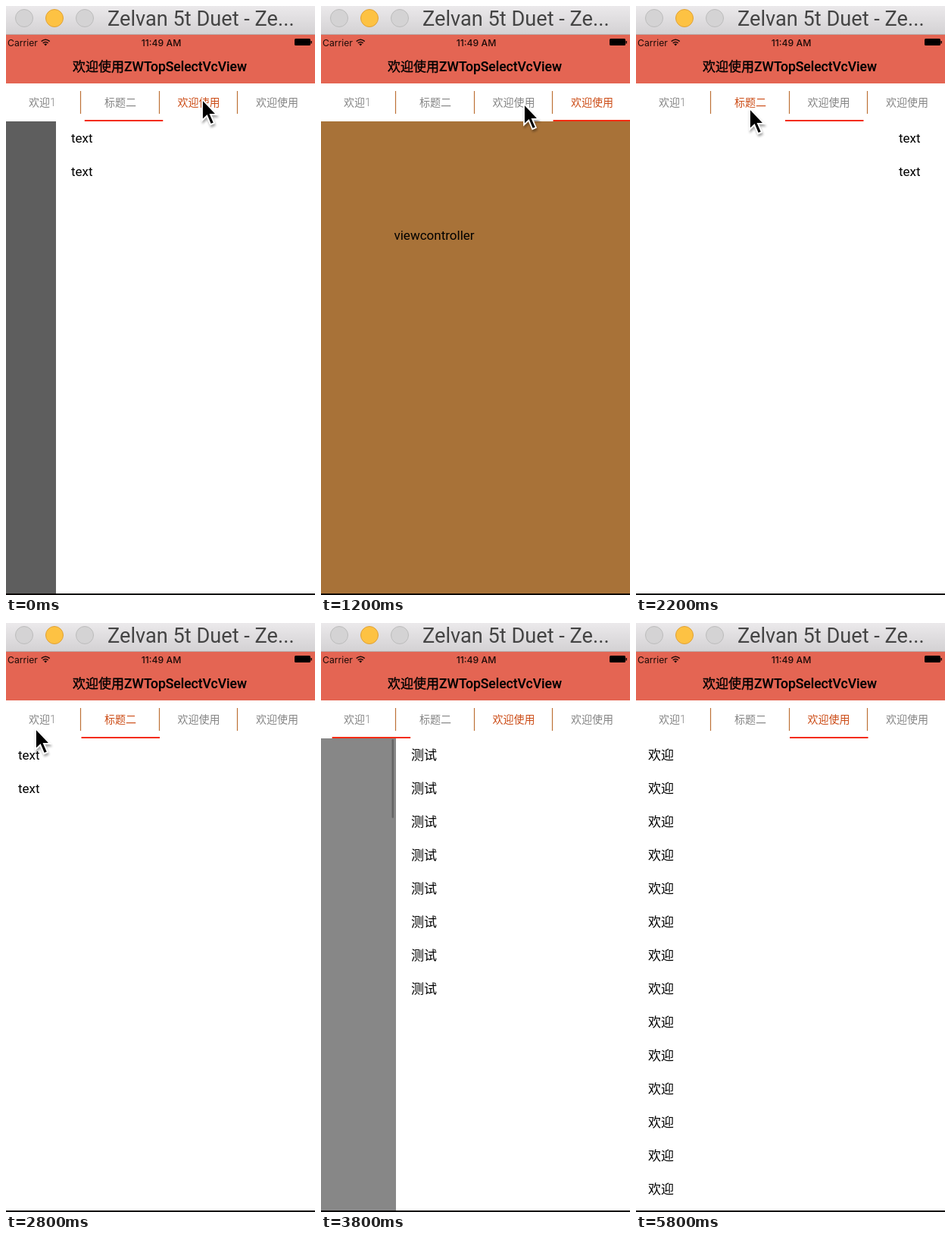
These frames come from a looping animation (408x776 px, 6000 ms). An HTML page:

```html
<!DOCTYPE html>
<html lang="zh">
<head>
<meta charset="utf-8">
<title>ZWTopSelectVcView</title>
<style>
  html, body { margin: 0; width: 100%; height: 100%; overflow: hidden; background: #fff; }
  svg { display: block; width: 408px; height: 776px; }
  text { font-family: Roboto, "Noto Sans CJK SC", "Noto Sans CJK", sans-serif; }
  .window { font-size: 27.2px; fill: #444; }
  .status { font: 12.2px Inter, sans-serif; fill: #1c0b08; }
  .clock { font-weight: 500; text-anchor: middle; }
  .heading { font-size: 17px; font-weight: 500; text-anchor: middle; }
  .heading .cjk { stroke: #000; stroke-width: .35px; }
  .heading .latin { font-size: 17.5px; stroke: #000; stroke-width: .15px; }
  .row { font-size: 17px; }
  .tab { font-size: 14px; font-weight: 300; fill: #858585; text-anchor: middle; }
  .tab.on { fill: #cc4c16; }
</style>
</head>
<body>
<svg viewBox="0 0 408 776">
  <defs>
    <linearGradient id="chrome" x2="0" y2="1">
      <stop offset="0" stop-color="#ebe9eb"/>
      <stop offset="1" stop-color="#d3d1d3"/>
    </linearGradient>
    <filter id="shadow" x="-50%" y="-30%" width="220%" height="180%">
      <feDropShadow dx="1" dy="3" stdDeviation="1.8" flood-opacity=".35"/>
    </filter>
  </defs>

  <rect width="408" height="776" fill="#fff"/>
  <g id="pages"></g>
  <rect y="774" width="408" height="2" fill="#0c0805"/>

  <rect y="102" width="408" height="50" fill="#fff"/>
  <path d="M98.5 112v30M202.5 112v30M305.5 112v30" stroke="#bd7136" stroke-width="1.2"/>
  <g id="tabs"></g>
  <rect id="bar" y="150" width="103.5" height="2" fill="#f42c12"/>

  <rect width="408" height="38" fill="url(#chrome)"/>
  <path d="M0 37.5H408" stroke="#b9aaa8"/>
  <g stroke="#bcbcbc" fill="#d4d3d4">
    <circle cx="24" cy="16" r="11.5"/>
    <circle cx="64" cy="16" r="11.5" fill="#fdc243" stroke="#dfa137"/>
    <circle cx="104" cy="16" r="11.5"/>
  </g>
  <text class="window" x="134" y="26">Zelvan 5t Duet - Ze...</text>

  <rect y="38" width="408" height="64" fill="#e46553"/>
  <text class="status" x="2" y="53">Carrier</text>
  <g fill="none" stroke="#1c0b08" stroke-width="1.5">
    <path d="M46.7 46.6Q52.2 41.8 57.7 46.6M48.8 48.9Q52.2 46 55.6 48.9"/>
    <path d="M50.2 50.2L52.2 52.6L54.2 50.2Q52.2 48.7 50.2 50.2Z" fill="#1c0b08" stroke="none"/>
  </g>
  <text class="status clock" x="205" y="53">11:49 AM</text>
  <rect x="381" y="43" width="21" height="9" rx="1.5"/>
  <path d="M403.2 46v3.5" stroke="#000" stroke-width="1.4"/>
  <text class="heading" x="203" y="86"><tspan class="cjk">欢迎使用</tspan><tspan class="latin">ZWTopSelectVcView</tspan></text>

  <path id="cursor" d="M0 0V27.5L6.3 21.6L11.2 33L15.8 31L10.9 19.8H19Z"
        stroke="#fff" stroke-width="1.8" filter="url(#shadow)"/>
</svg>

<script>
const LOOP = 6000, TICK = 200;
const LEFT = -4, WIDTH = 414, TAB = 103.5;
const PAGE_MS = 350, BAR_MS = 410;

// Each tap: [start, from tab, to tab]
const taps = [
  [-59, 1, 2], [763, 2, 3], [1486, 3, 2],
  [2130, 2, 1], [2930, 1, 0], [3713, 0, 2]
];

// Pointer tip: [time, x, y]
const pointer = [
  [0, 259, 123], [300, 259, 123], [700, 367, 123], [900, 367, 123],
  [1200, 268, 129], [1450, 262, 129], [1800, 223, 132], [2150, 150, 135],
  [2400, 150, 135], [2800, 39, 139], [3150, 39, 139], [3700, 250, 126]
];

const $ = id => document.getElementById(id);
const clamp = v => Math.max(0, Math.min(1, v));
const mix = (a, b, p) => a + (b - a) * p;
const easeInOut = p => p < .5 ? 2 * p * p : 1 - 2 * (1 - p) ** 2;

function add(parent, tag, attrs, text = "") {
  const el = document.createElementNS("http://www.w3.org/2000/svg", tag);
  for (const key in attrs) el.setAttribute(key, attrs[key]);
  el.textContent = text;
  return parent.appendChild(el);
}

function makePage(fill, label, count, x = 20, y = 180) {
  const g = add($("pages"), "g", {});
  add(g, "rect", { y: 152, width: WIDTH, height: 622, fill });
  for (let i = 0; i < count; i++) add(g, "text", { class: "row", x, y: y + 44 * i }, label);
  const scroll = add(g, "rect", { x: 408.5, y: 153, width: 2.5, height: 104, rx: 1.2, opacity: 0 });
  const shade = add(g, "rect", { y: 152, width: WIDTH, height: 622, opacity: 0 });
  return { g, scroll, shade };
}

const pages = [
  makePage("#fff", "测试", 8),
  makePage("#fff", "text", 2),
  makePage("#fff", "欢迎", 14),
  makePage("#a87238", "viewcontroller", 1, 100.5, 308)
];

const tabs = [["欢迎1", 48], ["标题二", 151], ["欢迎使用", 254.5], ["欢迎使用", 358]]
  .map(([label, x]) => add($("tabs"), "text", { class: "tab", x, y: 132 }, label));

function place(page, x, light) {
  page.g.style.display = "";
  page.g.setAttribute("transform", `translate(${x} 0)`);
  page.shade.setAttribute("opacity", 1 - light);
}

function drawPointer(t) {
  const next = pointer.findIndex(k => k[0] > t);
  $("cursor").style.display = next < 0 ? "none" : "";
  if (next < 0) return;
  const [t0, x0, y0] = pointer[next - 1], [t1, x1, y1] = pointer[next];
  const p = (t - t0) / (t1 - t0);
  $("cursor").setAttribute("transform", `translate(${mix(x0, x1, p)} ${mix(y0, y1, p)})`);
}

function draw(t) {
  const [start, from, to] = taps.filter(tap => tap[0] <= t).pop();
  const age = t - start, p = clamp(age / PAGE_MS);

  // The higher tab sits on the left and darkens as it leaves view.
  const shown = to > from ? p : 1 - p;
  const left = Math.max(from, to), right = Math.min(from, to);
  const edge = Math.round(LEFT + WIDTH * shown);
  for (const page of pages) page.g.style.display = "none";
  if (shown > 0) place(pages[left], edge - WIDTH, Math.sin(Math.min(Math.PI / 2, 2.25 * shown)));
  if (shown < 1) place(pages[right], edge, 1);

  const flash = to === 2 && p > .2 ? clamp((PAGE_MS + 400 - age) / 300) : 0;
  pages[2].scroll.setAttribute("opacity", .25 * flash);

  $("bar").setAttribute("x", LEFT + TAB * mix(from, to, easeInOut(clamp(age / BAR_MS))));
  tabs.forEach((tab, i) => tab.classList.toggle("on", i === to));
  drawPointer(t);
}

const begin = performance.now();
function frame() {
  const t = (performance.now() - begin) % LOOP;
  draw(Math.floor(t / TICK) * TICK);
  requestAnimationFrame(frame);
}
frame();
</script>
</body>
</html>
```
